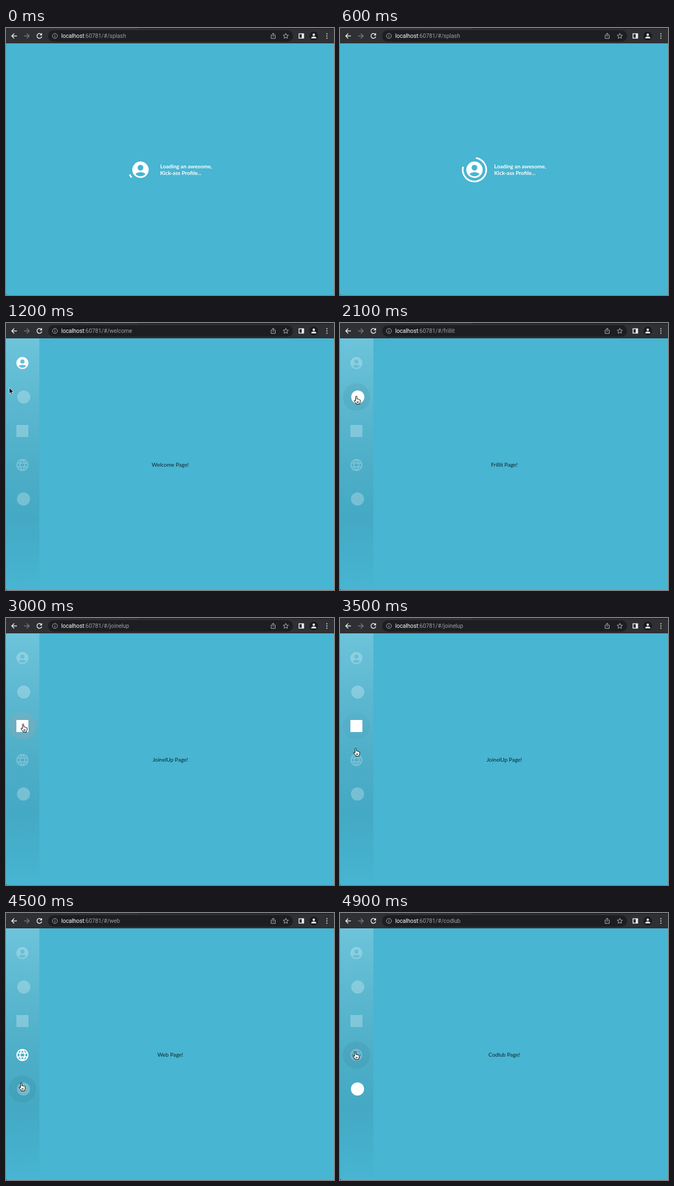
An HTML page for the animation above (5 s loop, 600 by 487 pixels).

```html
<!DOCTYPE html>
<html lang="en">
<head>
<meta charset="utf-8">
<title>Profile navigation</title>
<style>
  html, body { margin: 0; width: 100%; height: 100%; overflow: hidden; background: #48b5d2; }
  svg { display: block; width: 600px; height: 487px; }
  text { font-family: Lato, sans-serif; font-size: 10px; }
  .url { font-family: Roboto, sans-serif; font-size: 10.3px; fill: #9aa0a6; }
  .line { fill: none; stroke: #e8eaed; stroke-width: 1.5; }
  .thin { fill: none; stroke: #b4b8bd; stroke-width: 1; }
</style>
</head>
<body>
<svg viewBox="0 0 600 487">
  <defs>
    <linearGradient id="shade" x1="0" y1="0" x2="0" y2="1">
      <stop offset="0" stop-color="#6dc4db"/>
      <stop offset=".25" stop-color="#5cb8d0"/>
      <stop offset=".5" stop-color="#4eaec8"/>
      <stop offset=".72" stop-color="#44a9c4"/>
      <stop offset=".88" stop-color="#45b0cc"/>
      <stop offset="1" stop-color="#48b5d2"/>
    </linearGradient>
    <path id="person" fill-rule="evenodd" d="M0-10a10 10 0 1 0 0 20a10 10 0 1 0 0-20zM0-6a3.5 3.5 0 1 1 0 7a3.5 3.5 0 1 1 0-7zM0 8c-2 0-4.4-.8-6.1-2.9C-4.5 3.8-2.3 3 0 3s4.5.8 6.1 2.1C4.4 7.2 2 8 0 8z"/>
  </defs>

  <g id="splash" fill="#fff">
    <use href="#person" transform="translate(246 258.5) scale(1.5)"/>
    <circle id="spinner" r="21.5" pathLength="360" fill="none" stroke="#fff" stroke-width="3" stroke-linecap="square"/>
    <g font-weight="bold">
      <text x="282" y="256">Loading an awesome,</text>
      <text x="282" y="268">Kick-ass Profile...</text>
    </g>
  </g>

  <g id="page">
    <rect y="28" width="600" height="459" fill="#48b5d2"/>
    <rect y="28" width="61" height="459" fill="url(#shade)"/>
    <g id="inks"></g>
    <g id="icons" fill="#fff">
      <use href="#person" transform="translate(30 73) scale(1.1)"/>
      <circle cx="32.5" cy="135" r="12"/>
      <rect x="19" y="186" width="22" height="22"/>
      <g transform="translate(30 259)" fill="none" stroke="#fff" stroke-width="2">
        <path d="M0-10a10 10 0 1 0 0 20a10 10 0 1 0 0-20zq-9 10 0 20q9-10 0-20M-9.4-3.4H9.4M-9.4 3.4H9.4"/>
      </g>
      <circle cx="32" cy="321" r="12"/>
    </g>
    <text id="label" x="300.5" y="262" text-anchor="middle" fill="#10242b"></text>
  </g>

  <g id="toolbar">
    <rect width="600" height="28" fill="#2f3034"/>
    <rect x="242" width="358" height="1.3" fill="#1f2023"/>
    <rect x="77" y="4" width="448" height="21" rx="10.5" fill="#1d1e21"/>
    <path class="line" d="M20 14.5H11M15 10l-4.5 4.5L15 19"/>
    <path class="line" style="stroke:#74777c" d="M33 14.5h9M38 10l4.5 4.5L38 19"/>
    <path class="line" d="M64.5 11.5a4.4 4.4 0 1 0 .9 4"/>
    <path fill="#e8eaed" d="M66 9v4.6h-4.6z"/>
    <circle class="thin" cx="89.500" cy="14.500" r="4.500"/>
    <path class="thin" d="M89.500 14v3M89.500 12v1"/>
    <path class="thin" d="M487 13h-2v6h7.500v-6h-2M488.800 16V9.500M486.500 11.700l2.300-2.300 2.300 2.300"/>
    <path class="thin" d="M511.800 9.700l1.400 3.200 3.500.3-2.700 2.300.8 3.400-3-1.800-3 1.800.8-3.400-2.700-2.300 3.500-.3z"/>
    <path class="line" d="M536 10.500h8.500v8h-8.500z"/>
    <path fill="#e8eaed" d="M541 10h4v9h-4z"/>
    <circle cx="563" cy="14.500" r="8" fill="#1b1c1f"/>
    <path fill="#e8eaed" d="M563 10a2.200 2.200 0 1 1 0 4.400a2.200 2.200 0 1 1 0-4.400M558.500 19v-1q0-2.600 4.500-2.600t4.500 2.600v1z"/>
    <path d="M587 10.500v0M587 14.500v0M587 18.500v0" stroke="#e8eaed" stroke-width="2.200" stroke-linecap="round"/>
    <text class="url" x="101" y="18"><tspan fill="#fff">localhost</tspan><tspan id="route"></tspan></text>
  </g>

  <path d="M0 485q0 2 2 2H0z"/>
  <g id="cursor" stroke-linejoin="round">
    <path id="arrow" stroke="#fff" stroke-width=".8" d="M0 0v11l2.500-2.300 1.800 4 1.800-.8-1.800-3.900h3.500z"/>
    <path id="hand" fill="#fff" stroke="#000" stroke-width="1" d="M-1.400 8V1a1.200 1.200 0 0 1 2.400 0v4.200q2-.6 2.200.5 1.900-.4 2.100.6 1.800-.2 1.800 1.200v2.200q0 2-1.200 3.200v1.600h-6.400v-1.200q-2.200-2.400-3.600-5.400q0-1.600 2.700.5zM1.300 9.500v3M3.300 9.500v3"/>
  </g>
</svg>

<script>
const LOOP = 5000, STEP = 100, PUSH = 617, PUSH_TIME = 300;
const $ = id => document.getElementById(id);
const clamp = v => Math.min(1, Math.max(0, v));
const smooth = v => v * v * (3 - 2 * v);

const tabs = [
  { name: 'Welcome', tap: 0, hover: [] },
  { name: 'Frillit', tap: 1850, hover: [[1350, 2800]] },
  { name: 'JoinelUp', tap: 2950, hover: [[2830, 3450]] },
  { name: 'Web', tap: 3650, hover: [[3500, 4010], [4800, 5200]] },
  { name: 'Codlub', tap: 4650, hover: [[4050, 4780]] }
];

// time, x, y of the pointer tip
const pointerPath = [
  [1180, 0, 115], [1200, 6, 118], [1450, 30, 133.5], [2750, 30, 133.5],
  [2900, 31.5, 193.5], [3400, 31.5, 193.5], [3550, 28, 253], [3900, 28, 253],
  [4100, 28, 310], [4700, 28, 310], [4900, 28, 253], [5000, 28, 253]
];

const addInk = (y, fill) => {
  const ink = document.createElementNS('http://www.w3.org/2000/svg', 'circle');
  Object.entries({ cx: 30, cy: y, r: 25, fill }).forEach(([k, v]) => ink.setAttribute(k, v));
  return $('inks').appendChild(ink);
};
tabs.forEach((tab, i) => {
  tab.icon = $('icons').children[i];
  tab.shadow = addInk(73 + 62 * i, '#000');
  tab.flash = addInk(73 + 62 * i, '#bcbcbc');
});

function bezier(x1, y1, x2, y2) {
  const at = (a, b, s) => 3 * a * s * (1 - s) ** 2 + 3 * b * s * s * (1 - s) + s ** 3;
  return x => {
    let lo = 0, hi = 1;
    for (let i = 0; i < 24; i++) {
      const mid = (lo + hi) / 2;
      if (at(x1, x2, mid) < x) lo = mid; else hi = mid;
    }
    return at(y1, y2, lo);
  };
}
const slideEase = bezier(.35, .91, .33, .97);
const arcEase = bezier(.4, 0, .2, 1);

function drawSpinner(t) {
  const age = t + 1408;
  const cycle = age / 1333 % 1, turn = age / 2222 % 1;
  const head = 270 * arcEase(clamp(cycle * 2));
  const tail = 270 * arcEase(clamp(cycle * 2 - 1));
  const start = -90 + tail + turn * 360 + cycle * 90;
  $('spinner').setAttribute('stroke-dasharray', `${Math.max(head - tail, .1)} 360`);
  $('spinner').setAttribute('transform', `translate(246 258.5) rotate(${start})`);
}

function drawPages(t) {
  const slide = slideEase(clamp((t - PUSH) / PUSH_TIME));
  $('splash').setAttribute('transform', `translate(${-200 * slide})`);
  $('page').setAttribute('transform', `translate(${600 * (1 - slide)})`);

  const current = tabs.findLast(tab => t >= tab.tap);
  $('label').textContent = `${current.name} Page!`;
  $('route').textContent = ':60781/#/' + (t < PUSH ? 'splash' : current.name.toLowerCase());

  for (const tab of tabs) {
    tab.icon.setAttribute('opacity', tab === current ? 1 : .26);
    const hover = tab.hover.map(([a, b]) => Math.min(clamp((t - a) / 60), clamp(1 - (t - b) / 100)));
    tab.shadow.setAttribute('opacity', .05 * Math.max(0, ...hover));
    const press = tab.tap && Math.min(clamp((t - tab.tap + 130) / 100), clamp(1 - (t - tab.tap) / 220));
    tab.flash.setAttribute('opacity', .3 * press);
  }
}

function drawPointer(t) {
  const i = pointerPath.findLastIndex(p => t >= p[0]);
  $('cursor').style.display = i < 0 ? 'none' : '';
  if (i < 0) return;
  const [t0, x0, y0] = pointerPath[i];
  const [t1, x1, y1] = pointerPath[i + 1];
  const k = smooth((t - t0) / (t1 - t0));
  $('cursor').setAttribute('transform', `translate(${x0 + (x1 - x0) * k} ${y0 + (y1 - y0) * k})`);
  $('arrow').style.display = t < 1350 ? '' : 'none';
  $('hand').style.display = t < 1350 ? 'none' : '';
}

const begin = performance.now();
function draw() {
  const t = Math.floor((performance.now() - begin) % LOOP / STEP) * STEP;
  drawSpinner(t);
  drawPages(t);
  drawPointer(t);
  requestAnimationFrame(draw);
}
draw();
</script>
</body>
</html>
```
